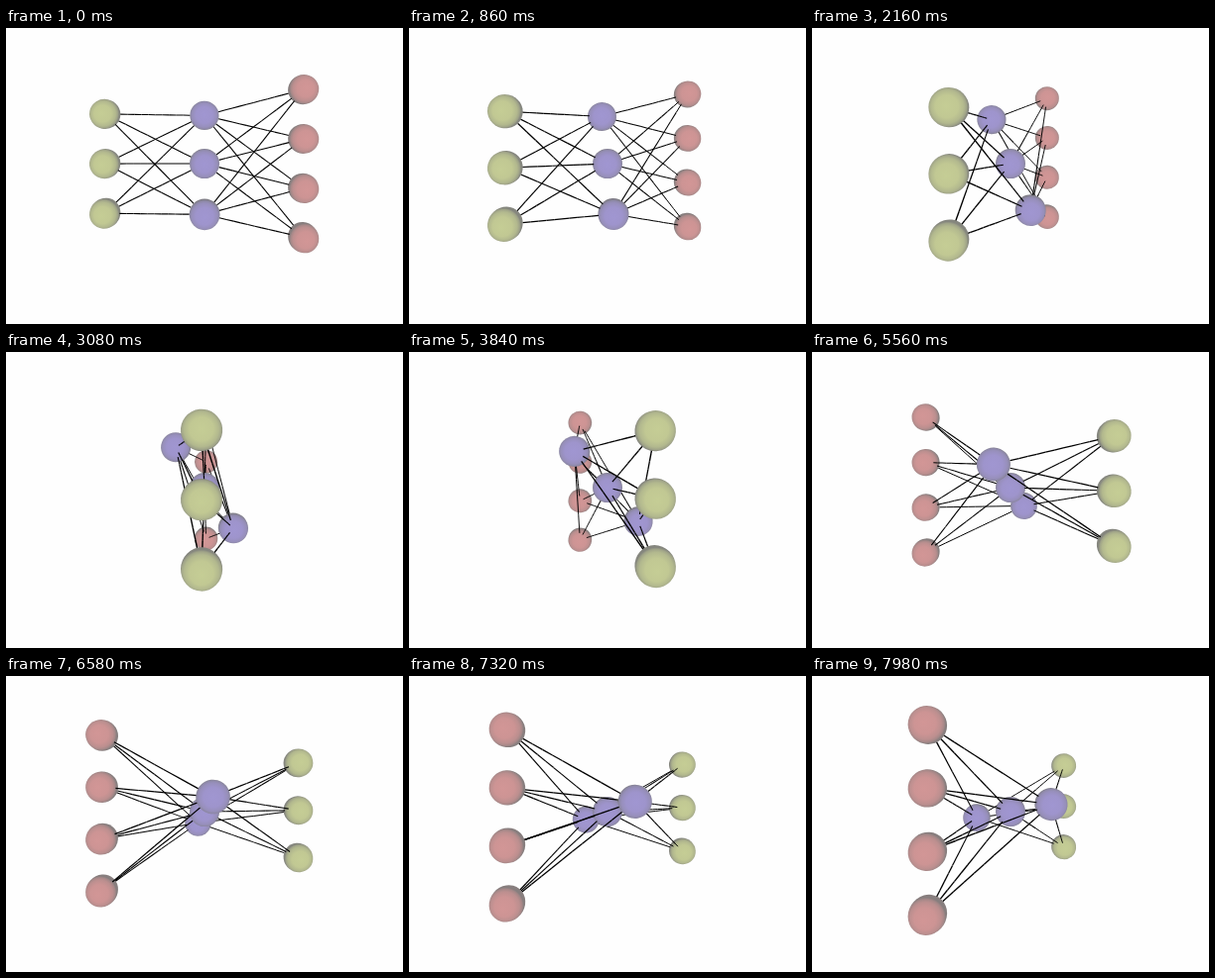
Write an HTML page with a canvas that moves like this. It is 400 by 299 pixels and loops after 8 s.

```html
<!DOCTYPE html>
<html lang="en">
<head>
<meta charset="utf-8">
<title>Rotating network</title>
<style>
  html, body { margin: 0; width: 100%; height: 100%; overflow: hidden; background: #fefefe; }
  canvas { display: block; }
</style>
</head>
<body>
<canvas id="stage" width="400" height="299"></canvas>
<script>
const ctx = document.getElementById('stage').getContext('2d');

const LOOP = 8000, STEP = 20;
const DISTANCE = 200 * Math.sqrt(3);   // camera to pivot, 60 degree field of view
const HORIZON = { x: 200, y: 107 };
const PIVOT_DROP = 30;                 // pivot lies below the camera axis
const RADIUS = 15, GAP = 50, PIECES = 10;

const LAYERS = [
  { count: 3, offset: -100, color: [197, 205, 149] },
  { count: 3, offset: 0, color: [160, 150, 209], tilts: true },
  { count: 4, offset: 100, color: [210, 150, 150] },
];

const mix = (a, b, t) => a + (b - a) * t;
const shade = (color, t) => `rgb(${color.map(c => Math.round(mix(c, 122, t)))})`;
const between = (a, b, t) => ({ x: mix(a.x, b.x, t), y: mix(a.y, b.y, t), z: mix(a.z, b.z, t) });

function project({ x, y, z }) {
  const scale = DISTANCE / (DISTANCE - z);
  return { x: HORIZON.x + x * scale, y: HORIZON.y + y * scale, scale };
}

function placeLayer({ count, offset, color, tilts }, turn, tilt) {
  const lean = tilts ? tilt : 0;
  return Array.from({ length: count }, (_, i) => {
    const along = (i - (count - 1) / 2) * GAP;
    const side = along * Math.sin(lean);
    return {
      x: offset * Math.cos(turn) + side * Math.sin(turn),
      y: along * Math.cos(lean) + PIVOT_DROP,
      z: -offset * Math.sin(turn) + side * Math.cos(turn),
      color,
    };
  });
}

function drawSphere(node) {
  const p = project(node);
  const front = project({ ...node, z: node.z + RADIUS });
  const r = RADIUS * p.scale;
  const dx = p.x - HORIZON.x, dy = p.y - HORIZON.y;
  const stretch = Math.hypot(1, Math.hypot(dx, dy) / DISTANCE);
  const shiftX = front.x - p.x, shiftY = front.y - p.y;

  const fill = ctx.createRadialGradient(
    p.x + shiftX * 0.8, p.y + shiftY * 0.8, 0,
    p.x + shiftX * 0.3, p.y + shiftY * 0.3, r * 1.04);
  [[0, 0], [0.55, 0.06], [0.8, 0.25], [0.92, 0.5], [1, 0.85]]
    .forEach(([at, dark]) => fill.addColorStop(at, shade(node.color, dark)));

  ctx.fillStyle = fill;
  ctx.beginPath();
  ctx.ellipse(p.x, p.y, r * stretch, r, Math.atan2(dy, dx), 0, 2 * Math.PI);
  ctx.fill();
}

function drawPiece(a, b) {
  const p = project(a), q = project(b);
  ctx.lineWidth = 1.1 * (p.scale + q.scale) / 2;
  ctx.beginPath();
  ctx.moveTo(p.x, p.y);
  ctx.lineTo(q.x, q.y);
  ctx.stroke();
}

// Links run from surface to surface, in short pieces that can be sorted by depth.
function linkPieces(a, b) {
  const inset = RADIUS / Math.hypot(b.x - a.x, b.y - a.y, b.z - a.z);
  const at = i => between(a, b, mix(inset, 1 - inset, i / PIECES));
  return Array.from({ length: PIECES }, (_, i) => {
    const start = at(i), end = at(i + 1);
    return { z: (start.z + end.z) / 2, draw: () => drawPiece(start, end) };
  });
}

function render(ms) {
  const time = Math.floor(ms % LOOP / STEP) * STEP / 1000;
  const turn = 0.01 + 0.5 * time;
  const tilt = (45 + 38 * Math.sin(0.28 * (time - 4))) * Math.PI / 180;
  const layers = LAYERS.map(layer => placeLayer(layer, turn, tilt));

  const items = layers.flat().map(node => ({ z: node.z, draw: () => drawSphere(node) }));
  for (let i = 0; i + 1 < layers.length; i++)
    for (const a of layers[i])
      for (const b of layers[i + 1]) items.push(...linkPieces(a, b));

  ctx.fillStyle = '#fefefe';
  ctx.fillRect(0, 0, 400, 299);
  ctx.strokeStyle = '#000';
  items.sort((a, b) => a.z - b.z).forEach(item => item.draw());
}

const began = performance.now();
function tick() {
  render(performance.now() - began);
  requestAnimationFrame(tick);
}
tick();
</script>
</body>
</html>
```
